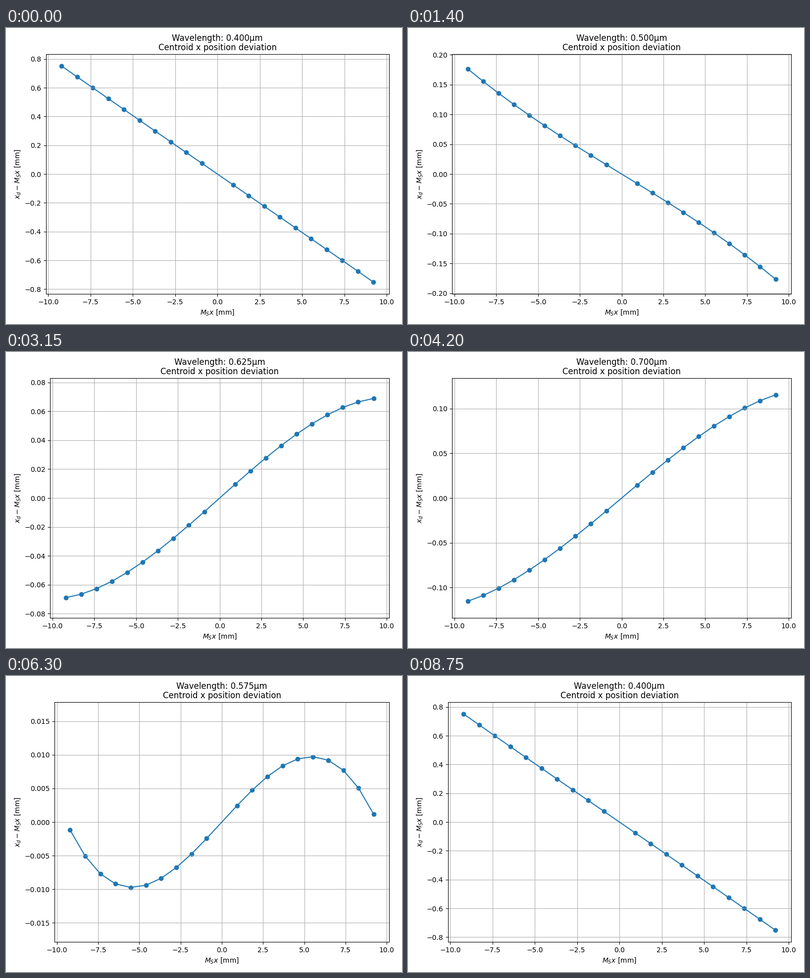
Write a matplotlib script that moves like this. It is 800x600 px and loops after 9.1 s.

```python
import numpy as np
import matplotlib.pyplot as plt
from matplotlib.animation import FuncAnimation

W, H, DPI = 800, 600, 100
STEPS = 13
X_MAX = 9.21
RIGHT, BOTTOM, TOP = 773.8, 60.9, 547
DIGIT = 8.84  # width of one tick label digit in pixels

# Field position from -1 to 1, without the centre.
k = np.arange(-10, 11)
T = k[k != 0] / 10

fig, ax = plt.subplots(figsize=(W / DPI, H / DPI), dpi=DPI)


def deviation(s):
    """Linear plus cubic distortion at wavelength step s."""
    edge = -0.3954 + 0.08053 * s - 0.003156 * s**2 - 0.3556 * 0.62**s
    cubic = -0.0045 - 0.0072 * np.sqrt(s)
    return (edge - cubic) * T + cubic * T**3


def place_axes():
    """Leave room on the left for the longest y tick label."""
    axis = ax.yaxis
    labels = axis.get_major_formatter().format_ticks(axis.get_majorticklocs())
    left = 80.6 + DIGIT * (max(map(len, labels)) - len("-0.0"))
    ax.set_position([left / W, BOTTOM / H,
                     (RIGHT - left) / W, (TOP - BOTTOM) / H])


def draw(i):
    step = min(i, 2 * STEPS - 1 - i)
    x, y = X_MAX * T, deviation(step)
    x_half = 1.1 * (X_MAX + 3 / 620)
    y_half = 1.1 * (np.abs(y).max() + 3 / 462)

    ax.clear()
    ax.plot(x, y, color="C0")
    ax.scatter(x, y, color="C0")
    ax.grid(True)
    ax.set_xlim(-x_half, x_half)
    ax.set_ylim(-y_half, y_half)
    ax.set_xlabel("$M_Sx$ [mm]")
    ax.set_ylabel("$x_d - M_Sx$ [mm]")
    ax.set_title(f"Wavelength: {0.4 + 0.025 * step:.3f}µm\n"
                 "Centroid x position deviation", linespacing=1.05)
    place_axes()
    return []


anim = FuncAnimation(fig, draw, frames=2 * STEPS, interval=350,
                     init_func=lambda: draw(0), repeat=True, repeat_delay=0)
plt.show()
```
